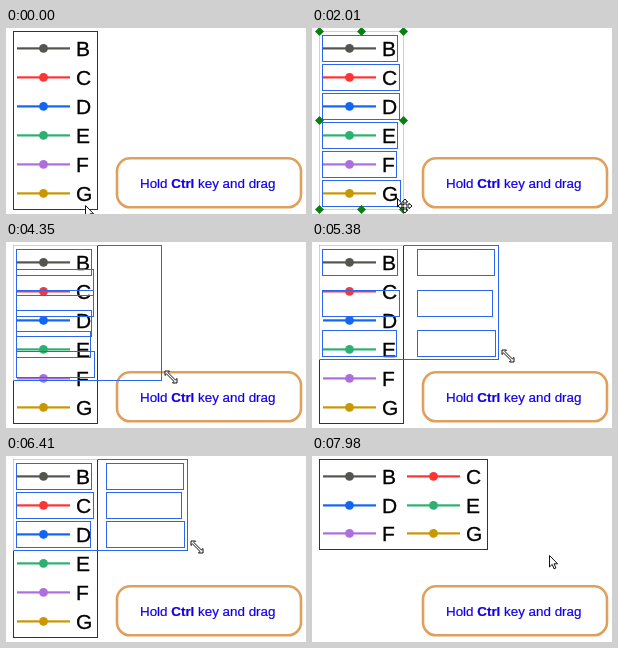
Animation, 300 px wide and 186 px high, one loop 8000 ms. Source, as an HTML page:

```html
<!DOCTYPE html>
<html lang="en">
<head>
<meta charset="utf-8">
<title>Legend resize</title>
<style>
html, body { margin: 0; width: 100%; height: 100%; overflow: hidden; background: #fff; }
svg { display: block; width: 300px; height: 186px; font-family: "Liberation Sans", Arial, sans-serif; }
.box { fill: none; stroke: #2a66f0; }
.cursor { fill: #fff; stroke: #111; }
</style>
</head>
<body>
<svg id="stage" viewBox="0 0 300 186">
  <rect x="111" y="130.3" width="184" height="49" rx="13" fill="#fff" stroke="#e0a05c" stroke-width="2.6"/>
  <text x="134" y="160" font-size="13.4" fill="#1400e8" stroke="#1400e8" stroke-width=".2">Hold <tspan font-weight="bold">Ctrl</tspan> key and drag</text>
</svg>
<script>
const LOOP = 8000, SELECT = 1500, PRESS = 2850, DRAG = 3600, DROP = 7400, DESELECT = 7980;
const LEFT = 7, TOP = 3, TALL = [91, 181], WIDE = [175, 93];
const stage = document.getElementById('stage');

function add(tag, attrs, parent = stage) {
  const el = document.createElementNS('http://www.w3.org/2000/svg', tag);
  set(el, attrs);
  return parent.appendChild(el);
}
function set(el, attrs) {
  for (const name in attrs) el.setAttribute(name, attrs[name]);
}
const show = (el, on) => set(el, { visibility: on ? 'visible' : 'hidden' });
const moveTo = (el, x, y) => set(el, { transform: `translate(${Math.round(x)} ${Math.round(y)})` });

const linear = p => p;
const easeOut = p => 1 - (1 - p) ** 3;

// Each move is [start, end, x, y]; the point rests between moves
function walk([x, y], moves, ease, t) {
  for (const [start, end, toX, toY] of moves) {
    const p = ease(Math.min(1, Math.max(0, (t - start) / (end - start))));
    x += (toX - x) * p;
    y += (toY - y) * p;
  }
  return [x, y];
}

const corner = t => walk(TALL, [
  [DRAG, 4720, 186, 117], [5380, 5860, 187, 95], [6220, 6620, ...WIDE]
], linear, t).map(Math.round);

const hand = t => walk([79, 177], [
  [290, 930, 87, 151], [1190, 1340, 80, 153], [1860, 2260, 86, 175],
  [2489, 2490, 94, 181], [3180, DRAG, 98, 195],
  [DROP - 1, DROP, 184, 90], [DROP, 7620, 237, 99]
], easeOut, t);

const frame = add('rect', { x: LEFT + .5, y: TOP + .5, fill: 'none', stroke: '#333' });
const items = [
  ['B', '#555550'], ['C', '#fb3434'], ['D', '#1266f2'],
  ['E', '#2db170'], ['F', '#ae6ee0'], ['G', '#c99700']
].map(([name, fill]) => {
  const g = add('g', { fill });
  add('rect', { x: 1, y: 12.3, width: 53, height: 2.2 }, g);
  add('circle', { cx: 27.5, cy: 13.4, r: 4.4 }, g);
  add('text', { x: 60, y: 21, 'font-size': 21, fill: '#000', stroke: '#000', 'stroke-width': .3 }, g)
    .textContent = name;
  return g;
});

const selection = add('g', {});
const outline = add('rect', { class: 'box', x: LEFT + .5, y: TOP + .5 }, selection);
const overlap = add('path', { fill: 'none', stroke: '#f3d36c' }, selection);
const boxes = [75, 77, 77, 75, 74, 78].map(width =>
  add('rect', { class: 'box', x: .5, y: .5, width, height: 26 }, selection));

const handles = add('g', { fill: '#0c7d12' });
const diamonds = [];
for (const u of [0, .5, 1]) for (const v of [0, .5, 1]) {
  if (u !== .5 || v !== .5)
    diamonds.push([u, v, add('path', { d: 'M.5-4 5 .5 .5 5-4 .5z' }, handles)]);
}

const cursors = {
  arrow: ['M.5.5V12L3.2 9.4 5 13.8 6.9 13 5.1 8.8H8.6z'],
  move: ['M.5.5V9L2.6 7.2H6.5z',
    'M8 1 10.7 4H9V7H12V5.3L15 8 12 10.7V9H9V12H10.7L8 15 5.3 12H7V9H4V10.7L1 8 4 5.3V7H7V4H5.3z'],
  resize: ['M-6-6H-1.5L-3-4.4 4.4 3 6 1.5V6H1.5L3 4.4-4.4-3-6-1.5z']
};
for (const name in cursors) {
  const g = add('g', { class: 'cursor' });
  cursors[name].forEach(d => add('path', { d }, g));
  cursors[name] = g;
}

// Spread six cells over the columns of a legend ending at (right, bottom)
function spread(cells, cols, right, bottom) {
  const pitch = (bottom - 36) / (6 / cols - 1);
  cells.forEach((cell, i) =>
    moveTo(cell, i % cols ? right - 81 : LEFT + 3, TOP + 4 + Math.floor(i / cols) * pitch));
}

function draw(t) {
  const dropped = t >= DROP;
  const [fr, fb] = dropped ? WIDE : TALL;
  const [r, b] = corner(t);
  const selected = t >= SELECT && t < DESELECT;

  set(frame, { width: fr - LEFT, height: fb - TOP });
  spread(items, dropped ? 2 : 1, fr, fb);

  show(selection, selected);
  set(outline, { width: r - LEFT, height: b - TOP });
  const closed = r === fr && b === fb;
  set(overlap, {
    d: `M${Math.min(r, fr) + .5} ${TOP + .5}H${LEFT + .5}V${Math.min(b, fb) + .5}` +
      (closed ? `H${r + .5}z` : '')
  });
  spread(boxes, r > 165 ? 2 : 1, r, b);

  show(handles, selected && (t < PRESS || dropped));
  for (const [u, v, el] of diamonds)
    moveTo(el, LEFT + u * (fr - LEFT), TOP + v * (fb - TOP));

  const kind = t < 1580 || dropped ? 'arrow' : t < 2490 ? 'move' : 'resize';
  const dragging = t > DRAG + 40 && !dropped;
  for (const name in cursors) show(cursors[name], name === kind);
  moveTo(cursors[kind], ...(dragging ? [r + 10, b - 3] : hand(t)));
}

function tick() {
  draw(performance.now() % LOOP);
  requestAnimationFrame(tick);
}
tick();
</script>
</body>
</html>
```
